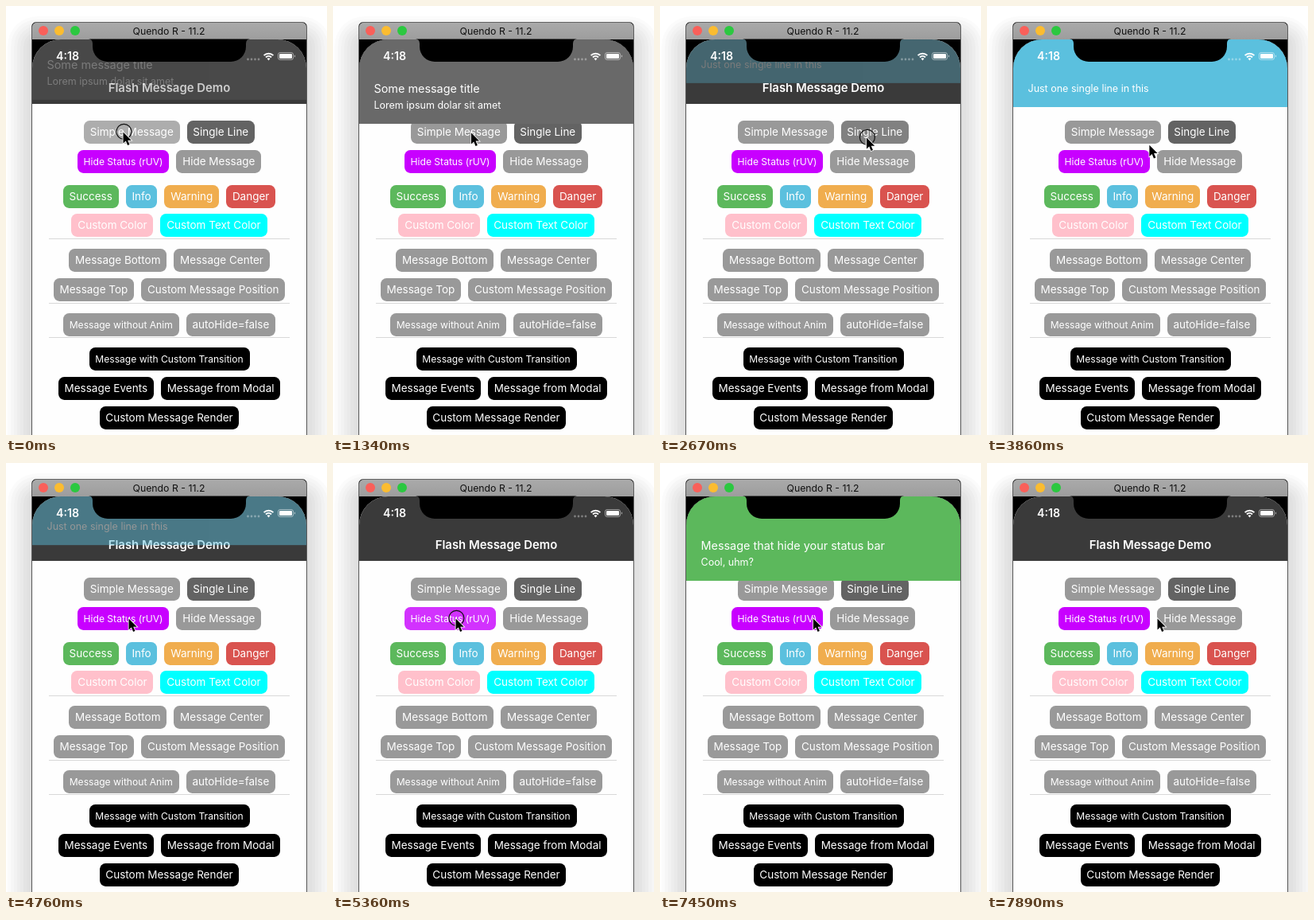
An HTML page that plays this animation: 404 by 539 pixels, repeating every 8000 ms.

```html
<!DOCTYPE html>
<html lang="en">
<head>
<meta charset="utf-8">
<title>Flash Message Demo</title>
<style>
  html, body { margin: 0; width: 100%; height: 100%; overflow: hidden; background: #fff; }
  #stage { position: absolute; inset: 0; overflow: hidden; color: #fff; font-family: Inter, Roboto, sans-serif; white-space: nowrap; }
  #stage > svg { position: absolute; left: 0; top: 0; }
  #phone { position: absolute; left: 33px; top: 42px; width: 345px; height: 497px; overflow: hidden;
    border-radius: 36px 36px 0 0; background: #fefefe; }
  #header { height: 81px; background: #3a3a3a; font: 600 14.9px/20px Inter, Roboto, sans-serif;
    text-align: center; box-sizing: border-box; padding-top: 51px; margin-bottom: 21px; }
  .group { position: relative; margin-bottom: 14.8px; }
  .line::before { content: ''; position: absolute; left: 21px; top: -13px; width: 303px; height: 1px; background: #d8d8d8; }
  .row { display: flex; justify-content: center; gap: 9px; margin-bottom: 7.75px; }
  .button { height: 29px; padding: 0 7.8px; border-radius: 7.4px; font-size: 13.5px; line-height: 29px; }
  .small { font-size: 12.1px; }
  .message { position: absolute; left: 0; right: 0; top: 0; padding: 52px 18.5px 13px; font-size: 12.5px; line-height: 20px; }
  .message b { display: block; font-size: 14.4px; font-weight: 400; margin-bottom: 1.4px; }
  svg text { fill: #fff; }
</style>
</head>
<body>
<div id="stage">
  <svg width="404" height="539">
    <defs><linearGradient id="bar" x2="0" y2="1"><stop stop-color="#aaa"/><stop offset="1" stop-color="#9d9d9d"/></linearGradient></defs>
    <g id="shadow" opacity=".9"></g>
    <rect x="32.5" y="20.5" width="346" height="600" rx="5" fill="#000" stroke="#000" stroke-opacity=".2"/>
    <path d="M33 42V26a5 5 0 0 1 5-5H373a5 5 0 0 1 5 5V42Z" fill="url(#bar)"/>
    <circle cx="47" cy="31" r="6" fill="#f9605a"/>
    <circle cx="67" cy="31" r="6" fill="#fbbc30"/>
    <circle cx="87" cy="31" r="6" fill="#2bc840"/>
    <text x="205" y="35.7" font-size="12.3" text-anchor="middle" style="fill:#111">Quendo R - 11.2</text>
  </svg>
  <div id="phone"><div id="header">Flash Message Demo</div></div>
  <svg width="404" height="539">
    <path d="M104 41.5q5 0 5 6v3.5a19 19 0 0 0 19 19H283a19 19 0 0 0 19-19v-3.5q0-6 5-6Z"/>
    <g id="status">
      <text x="63" y="68" font-size="14.2" font-weight="600">4:18</text>
      <path d="M304.5 67H319" stroke="#fff" stroke-opacity=".35" stroke-width="2.8" stroke-linecap="round" stroke-dasharray="0 4.5"/>
      <g fill="none" stroke="#fff" stroke-width="2">
        <path d="M324.6 62.1a8.4 8.4 0 0 1 11.8 0M327 64.5a5 5 0 0 1 7 0"/>
        <rect x="342.5" y="58.5" width="19" height="9" rx="2.5" stroke-width="1" stroke-opacity=".5"/>
      </g>
      <path d="M330.5 68.5l-2-2.4a3 3 0 0 1 4 0ZM363 61.3q1.6 1.7 0 3.4Z" fill="#fff"/>
      <rect x="344" y="60" width="16" height="6" rx="1.2" fill="#fff"/>
    </g>
    <g id="pointer">
      <circle id="ring" cx=".9" cy="-.5" r="9.5" fill="none" stroke="#111" stroke-width="1.2"/>
      <path d="M0 0V14.2L3.3 11.2 5.6 16.6 8 15.6 5.7 10.3H10.2Z" stroke="#fff" stroke-width="1.6" paint-order="stroke"/>
    </g>
  </svg>
</div>
<script>
const GRAY = '#999', GREEN = '#5cb85c', BLUE = '#5bc0de', BLACK = '#000';

// groups of rows of buttons: label, colour, small text
const groups = [
  [[['Simple Message', GRAY], ['Single Line', '#636363']],
   [['Hide Status (rUV)', '#c800ff', true], ['Hide Message', GRAY]]],
  [[['Success', GREEN], ['Info', BLUE], ['Warning', '#f0ad4e'], ['Danger', '#d9534f']],
   [['Custom Color', 'pink'], ['Custom Text Color', 'cyan']]],
  [[['Message Bottom', GRAY], ['Message Center', GRAY]],
   [['Message Top', GRAY], ['Custom Message Position', GRAY]]],
  [[['Message without Anim', GRAY, true], ['autoHide=false', GRAY]]],
  [[['Message with Custom Transition', BLACK, true]],
   [['Message Events', BLACK], ['Message from Modal', BLACK]],
   [['Custom Message Render', BLACK]]]
];

// "at" is the frame in which the message is fading in
const messages = [
  { at: 0, fill: '#696969', title: 'Some message title', body: 'Lorem ipsum dolar sit amet' },
  { at: 18, fill: BLUE, body: 'Just one single line in this' },
  { at: 37, fill: GREEN, title: 'Message that hide your status bar', body: 'Cool, uhm?' }
];

// pointer trips: first frame, length in frames, end point
const home = { x: 147.5, y: 158.4 };
const trips = [
  { from: 8, span: 8, x: 260, y: 165.4 },
  { from: 25, span: 3.2, x: 154.5, y: 195.4 },
  { from: 48, span: 5, x: 214.5, y: 195.4 }
];

const FRAME = 148.7, LOOP = 8000, STAY = 14, SLIDE = 45;
const get = id => document.getElementById(id);
const clamp = v => Math.min(1, Math.max(0, v));

// soft window shadow in steps
for (let d = 31; d > 0; d -= 4)
  get('shadow').innerHTML += `<rect x="${33 - d}" y="${44 - d}" width="${345 + 2 * d}" height="700" rx="${d + 6}" opacity=".018"/>`;

const div = (name, inner, fill = '') =>
  `<div class="${name}" style="background:${fill}">${inner}</div>`;
const button = ([text, fill, small]) => div(small ? 'button small' : 'button', text, fill);
const row = buttons => div('row', buttons.map(button).join(''));
const group = (rows, i) => div(i > 1 ? 'group line' : 'group', rows.map(row).join(''));
const message = m => div('message', (m.title ? `<b>${m.title}</b>` : '') + m.body, m.fill);
get('phone').innerHTML += groups.map(group).join('') + messages.map(message).join('');

const buttonEls = document.querySelectorAll('.button');
const messageEls = document.querySelectorAll('.message');

// share of a message that is visible, k frames after it begins to fade in
const visibility = k => Math.min(clamp(.33 + .67 * k), clamp(.47 + .53 * (STAY - k)));

function pointerAt(n) {
  let { x, y } = home;
  for (const trip of trips) {
    const u = clamp((n - trip.from) / trip.span);
    x += (trip.x - x) * (1 - (1 - u) ** 2);
    y += (trip.y - y) * u;
  }
  return `translate(${x} ${y})`;
}

function draw(t) {
  const n = Math.floor((t + 8) / FRAME);
  let touching = false;
  messages.forEach(({ at }, i) => {
    const v = visibility(n - at), pressed = n === at || n === at - 1;
    messageEls[i].style.opacity = v;
    messageEls[i].style.transform = `translateY(${SLIDE * (v - 1)}px)`;
    buttonEls[i].style.opacity = pressed ? .8 : 1;
    touching ||= pressed;
  });
  get('status').setAttribute('opacity', 1 - messageEls[2].style.opacity);
  get('pointer').setAttribute('transform', pointerAt(n));
  get('ring').setAttribute('opacity', touching ? 1 : 0);
}

const start = performance.now();
function tick() {
  draw((performance.now() - start) % LOOP);
  requestAnimationFrame(tick);
}
tick();
</script>
</body>
</html>
```
